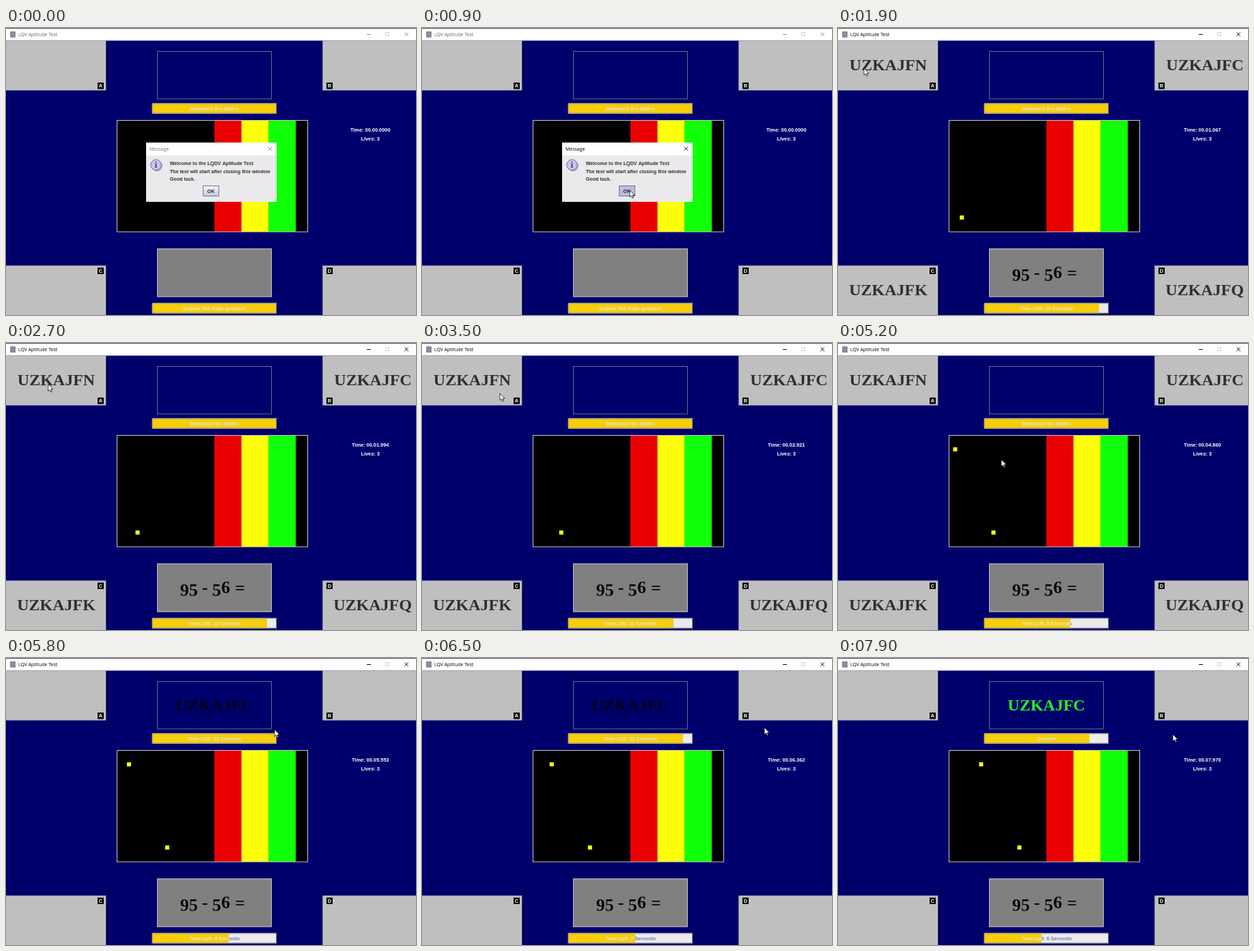
These frames come from a looping animation (600 px wide and 421 px high, 8 s). An HTML page with a canvas:

```html
<!DOCTYPE html>
<html lang="en">
<head>
<meta charset="utf-8">
<title>Aptitude test</title>
<style>
html, body { margin: 0; width: 100%; height: 100%; overflow: hidden; background: #00006c; }
canvas { display: block; }
</style>
</head>
<body>
<canvas id="stage" width="600" height="421"></canvas>
<script>
const ctx = document.getElementById('stage').getContext('2d');
const LOOP = 8000, STEP = 100, START = 1000;
const NAVY = '#00006c', GREY = '#bfbfbf', GOLD = '#f6ce0a', PALE = '#ececec';
const SANS = '"Liberation Sans", Arial, sans-serif';
const BOLD = `bold 7.4px ${SANS}`;
const DIALOG = `bold 7.2px ${SANS}`;
const TITLE = '6.95px "Open Sans", sans-serif';
const WORD = 'bold 24px "Liberation Serif", serif';
const SUM = 'bold 26px "Liberation Serif", serif';

// Keyed values: [time, ...values]
const clockKeys = [[973, 0], [1900, 1.067], [3500, 2.921], [5200, 4.86], [6500, 6.362], [7900, 7.97]];
const pointerKeys = [[400, 585, 419], [800, 304, 238], [1000, 304, 238], [1800, 38, 59], [1900, 38, 59],
  [2200, 29, 52], [3500, 114, 74], [5200, 239, 171], [6100, 470, 72], [6500, 501, 102], [7900, 490, 112]];
const arrow = new Path2D('M0 0V10.2L2.4 8L4 11.6L5.6 10.9L4 7.4H7.2Z');

function sample(keys, t) {
  if (t <= keys[0][0]) return keys[0].slice(1);
  const i = keys.findIndex(k => k[0] > t);
  if (i < 0) return keys.at(-1).slice(1);
  const a = keys[i - 1], b = keys[i], p = (t - a[0]) / (b[0] - a[0]);
  return a.slice(1).map((v, j) => v + (b[j + 1] - v) * p);
}

function outline(x, y, w, h, color) {
  ctx.strokeStyle = color;
  ctx.lineWidth = 1;
  ctx.strokeRect(x + .5, y + .5, w - 1, h - 1);
}

function rect(x, y, w, h, fill, line) {
  ctx.fillStyle = fill;
  ctx.fillRect(x, y, w, h);
  if (line) outline(x, y, w, h, line);
}

function text(str, x, y, font, color, align = 'center') {
  ctx.font = font;
  ctx.fillStyle = color;
  ctx.textAlign = align;
  ctx.fillText(str, x, y);
}

function cross(x, y, r, color) {
  ctx.strokeStyle = color;
  ctx.lineWidth = .9;
  ctx.beginPath();
  ctx.moveTo(x - r, y - r);
  ctx.lineTo(x + r, y + r);
  ctx.moveTo(x + r, y - r);
  ctx.lineTo(x - r, y + r);
  ctx.stroke();
}

function clipped(x, y, w, h, draw) {
  ctx.save();
  ctx.beginPath();
  ctx.rect(x, y, w, h);
  ctx.clip();
  draw();
  ctx.restore();
}

// Progress bar whose label changes colour at the edge of the fill
function gauge(y, label, left) {
  const x = 214, w = 182, h = 15, fill = Math.round(w * left / 13);
  rect(x, y, w, h, PALE);
  rect(x, y, fill, h, GOLD);
  clipped(x, y, fill, h, () => text(label, 305, y + 10.5, BOLD, '#e9e4e4'));
  clipped(x + fill, y, w - fill, h, () => text(label, 305, y + 10.5, BOLD, '#7474bd'));
  outline(x - .5, y, w + .5, h, '#8f8f9a');
}

function titleBar(active) {
  const ink = active ? '#000' : '#8c8c8c';
  rect(0, 0, 600, 18.5, '#fff');
  rect(0, 0, 600, 1, '#57455f');
  rect(6, 5, 8, 9, '#8d8b98');
  text('LQV Aptitude Test', 18, 12.3, TITLE, active ? '#000' : '#666', 'left');
  rect(528, 9, 6, 1, ink);
  outline(555, 6, 6, 6, '#d0d0d0');
  cross(586, 9.3, 2.8, ink);
}

function corner(x, y, w, tag, tagX, tagY, word, wordX) {
  rect(x, y, w, 73, GREY);
  rect(tagX, tagY, 9, 9.5, '#000');
  text(tag, tagX + 4.5, tagY + 7.4, `bold 7.5px ${SANS}`, '#fff');
  if (word) text(word, wordX, y + 43.7, WORD, '#303030');
}

function question() {
  const ink = '#0a0a0a';
  // Old-style figures: 9 and 5 hang below the line
  text('95', 254.7, 371.3, SUM, ink, 'left');
  text('-', 291, 367, SUM, ink);
  text('5', 301.7, 371.3, SUM, ink, 'left');
  text('6', 315, 367.3, SUM, ink, 'left');
  text('=', 342.5, 368, SUM, ink);
}

function dialog(active, hover) {
  rect(205, 168, 191, 87, '#ebe9eb');
  rect(205, 168, 191, 19, '#fff');
  text('Message', 210, 180, TITLE, active ? '#000' : '#777', 'left');
  cross(386.5, 177, 2.8, active ? '#000' : '#777');

  ctx.fillStyle = '#a9a9b4';
  ctx.beginPath();
  ctx.arc(221, 202.3, 8, 0, 7);
  ctx.fill();
  ctx.fillStyle = '#c6c6ee';
  ctx.strokeStyle = '#6b6ba6';
  ctx.lineWidth = 1;
  ctx.beginPath();
  ctx.arc(219.5, 200.8, 7.7, 0, 7);
  ctx.fill();
  ctx.stroke();
  text('i', 219.5, 205, 'bold 12px "Liberation Serif", serif', '#35357c');

  ['Welcome to the LQDV Aptitude Test', 'The test will start after closing this window', 'Good luck.']
    .forEach((line, i) => text(line, 239.7, 201 + i * 11.6, DIALOG, '#303030', 'left'));

  const shade = ctx.createLinearGradient(0, 231, 0, 247);
  shade.addColorStop(0, '#f4f4fb');
  shade.addColorStop(1, '#c6c8df');
  rect(288, 231, 24, 16, hover ? '#bcbcdc' : shade, '#73739a');
  text('OK', 300, 241.8, DIALOG, '#252530');
}

function pointer(x, y) {
  ctx.save();
  ctx.translate(x, y);
  ctx.fillStyle = '#fff';
  ctx.strokeStyle = '#111';
  ctx.lineWidth = .8;
  ctx.fill(arrow);
  ctx.stroke(arrow);
  ctx.restore();
}

function draw(t) {
  const running = t >= START, clock = sample(clockKeys, t)[0];
  const recall = clock >= 5, correct = t >= 7500, showWords = running && !recall;
  const words = showWords ? ['N', 'C', 'K', 'Q'].map(c => 'UZKAJF' + c) : [];
  const countdown = since => 13 - Math.floor(clock - since);
  const timeLeft = n => `Time Left: ${n} Seconds`;

  rect(0, 0, 600, 421, NAVY);
  titleBar(running);
  corner(0, 18.5, 146.3, 'A', 134, 80, words[0], 73.5);
  corner(463.3, 18.5, 137, 'B', 469, 80, words[1], 537);
  corner(0, 348.5, 146.3, 'C', 134, 351.5, words[2], 73.5);
  corner(463.3, 348.5, 137, 'D', 469, 351.5, words[3], 536.5);

  rect(221, 34, 168, 70.5, NAVY, '#6c6c88');
  if (recall) text('UZKAJFC', 305, 77, WORD, correct ? '#22f51c' : '#000016');
  const upper = correct ? 'Correct' : recall ? timeLeft(countdown(5)) : 'Memorize the letters';
  gauge(110.5, upper, recall ? countdown(5) : 13);

  rect(162, 135, 280, 164.5, '#000');
  rect(305, 136, 39.5, 163, '#ea0000');
  rect(344.5, 136, 39.5, 163, '#ffff0a');
  rect(384, 136, 40, 163, '#12ff0a');
  outline(162, 135, 280, 164.5, '#c8c8c8');
  if (running) {
    const x = 165.2 + 12.2 * clock;
    rect(x, 275, 6, 6, '#ffff0e');
    if (x - 56 >= 165) rect(x - 56, 153, 6, 6, '#ffff0e');
  }

  rect(221, 323.5, 168, 71, '#808080', '#c4c4c4');
  if (running) question();
  gauge(403.5, running ? timeLeft(countdown(0)) : 'Answer the math question', running ? countdown(0) : 13);

  const stamp = running ? clock.toFixed(3).padStart(6, '0') : '00.0000';
  text(`Time: 00.${stamp}`, 533.2, 151.8, BOLD, '#fff');
  text('Lives: 3', 533.2, 164.5, BOLD, '#fff');

  if (!running) dialog(t >= 500, t >= 800);
  if (t >= 400) pointer(...sample(pointerKeys, t));
}

function tick(now) {
  draw(Math.floor(now % LOOP / STEP) * STEP);
  requestAnimationFrame(tick);
}
draw(0);
requestAnimationFrame(tick);
</script>
</body>
</html>
```
